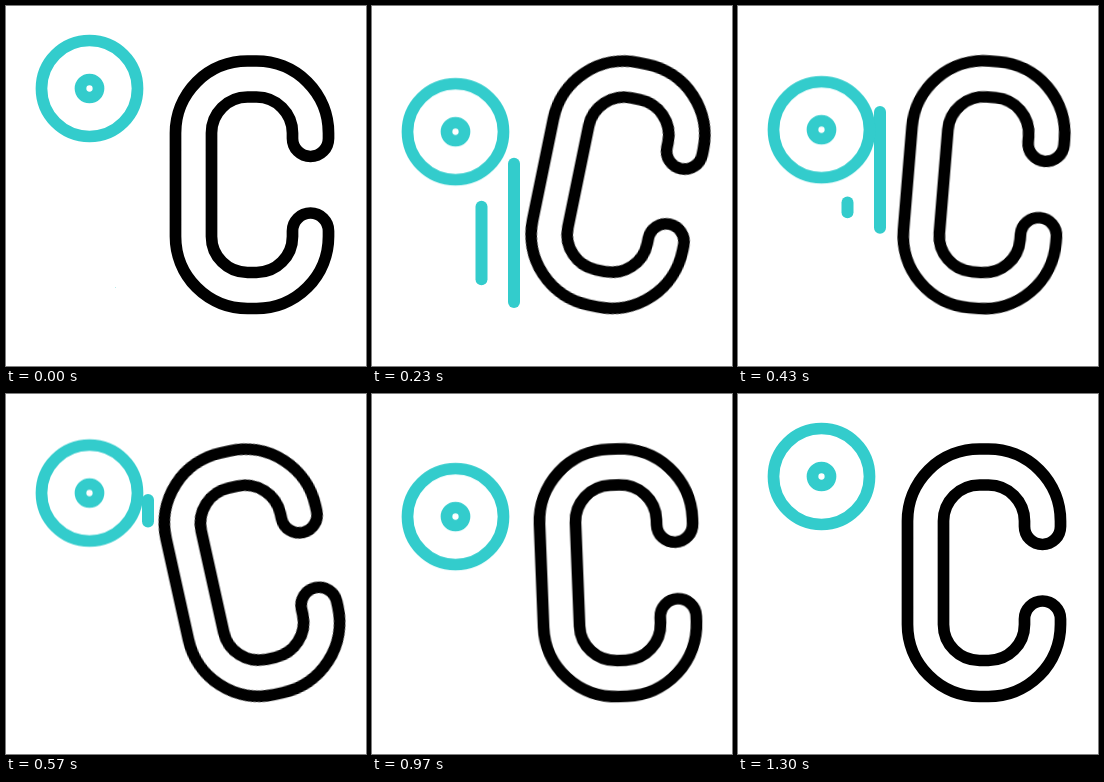
An HTML page without scripts for the animation above (1670 ms loop, 360 by 360 pixels).

```html
<!DOCTYPE html>
<html lang="en">
<head>
<meta charset="utf-8">
<title>Celsius</title>
<style>
  @property --head { syntax: "<number>"; inherits: false; initial-value: 0; }
  @property --tail { syntax: "<number>"; inherits: false; initial-value: 0; }

  html, body { margin: 0; width: 100%; height: 100%; overflow: hidden; background: #fff; }
  svg {
    --line: 11.7px;
    --accent: #33cccc;
    display: block; width: 100%; height: 100%;
    fill: none; stroke-linecap: round;
  }
  .letter, .degree, .streak {
    animation-duration: 1.67s;
    animation-iteration-count: infinite;
    animation-timing-function: cubic-bezier(.33, 0, .67, 1);
  }

  /* The outline is a wide black stroke with a white core 36px between line centres. */
  .letter { transform-origin: 246px 178.75px; animation-name: swing; }
  .edge { stroke: #000; stroke-width: calc(36px + var(--line)); }
  .core { stroke: #fff; stroke-width: calc(36px - var(--line)); }

  .degree { stroke: var(--accent); stroke-width: var(--line); animation-name: bob; }

  /* Each streak shows the part of its line between tail and head. */
  .streak {
    --span: calc(var(--head) - var(--tail));
    stroke: var(--accent);
    stroke-width: min(12px, var(--span) * 9999px);
    stroke-dasharray: calc(var(--span) * var(--length)) 999px;
    stroke-dashoffset: calc(var(--tail) * var(--length) * -1);
  }
  .short { --length: 85px; animation-name: draw-short, erase-short; }
  .long { --length: 190px; animation-name: draw-long, erase-long; }

  @keyframes swing {
    0%, 78%, 100% { transform: rotate(0deg); }
    20% { transform: rotate(15deg); }
    34% { transform: rotate(-12.5deg); }
    48% { transform: rotate(7.5deg); }
    62% { transform: rotate(-4.5deg); }
  }
  @keyframes bob {
    0%, 78%, 100% { transform: translateY(0); }
    20% { transform: translateY(56px); }
    34% { transform: translateY(16.5px); }
    55% { transform: translateY(42.3px); }
  }
  @keyframes draw-short { 0% { --head: 0; } 16%, 100% { --head: 1; } }
  @keyframes erase-short { 0%, 10% { --tail: 0; } 30%, 100% { --tail: 1; } }
  @keyframes draw-long { 0%, 2% { --head: 0; } 20%, 100% { --head: 1; } }
  @keyframes erase-long { 0%, 16% { --tail: 0; } 39%, 100% { --tail: 1; } }
</style>
</head>
<body>
<svg viewBox="0 0 360 360">
  <defs>
    <path id="c" d="M304.5 132.5V127a54 54 0 0 0-54-54h-9a54 54 0 0 0-54 54v103.5a54 54 0 0 0 54 54h9a54 54 0 0 0 54-54V225"/>
  </defs>
  <g class="letter">
    <use href="#c" class="edge"/>
    <use href="#c" class="core"/>
  </g>
  <path class="streak short" d="M109.5 281.5v-85"/>
  <path class="streak long" d="M142 296v-190"/>
  <g class="degree">
    <circle cx="83.5" cy="82.5" r="48"/>
    <circle cx="83.5" cy="82.5" r="9"/>
  </g>
</svg>
</body>
</html>
```
